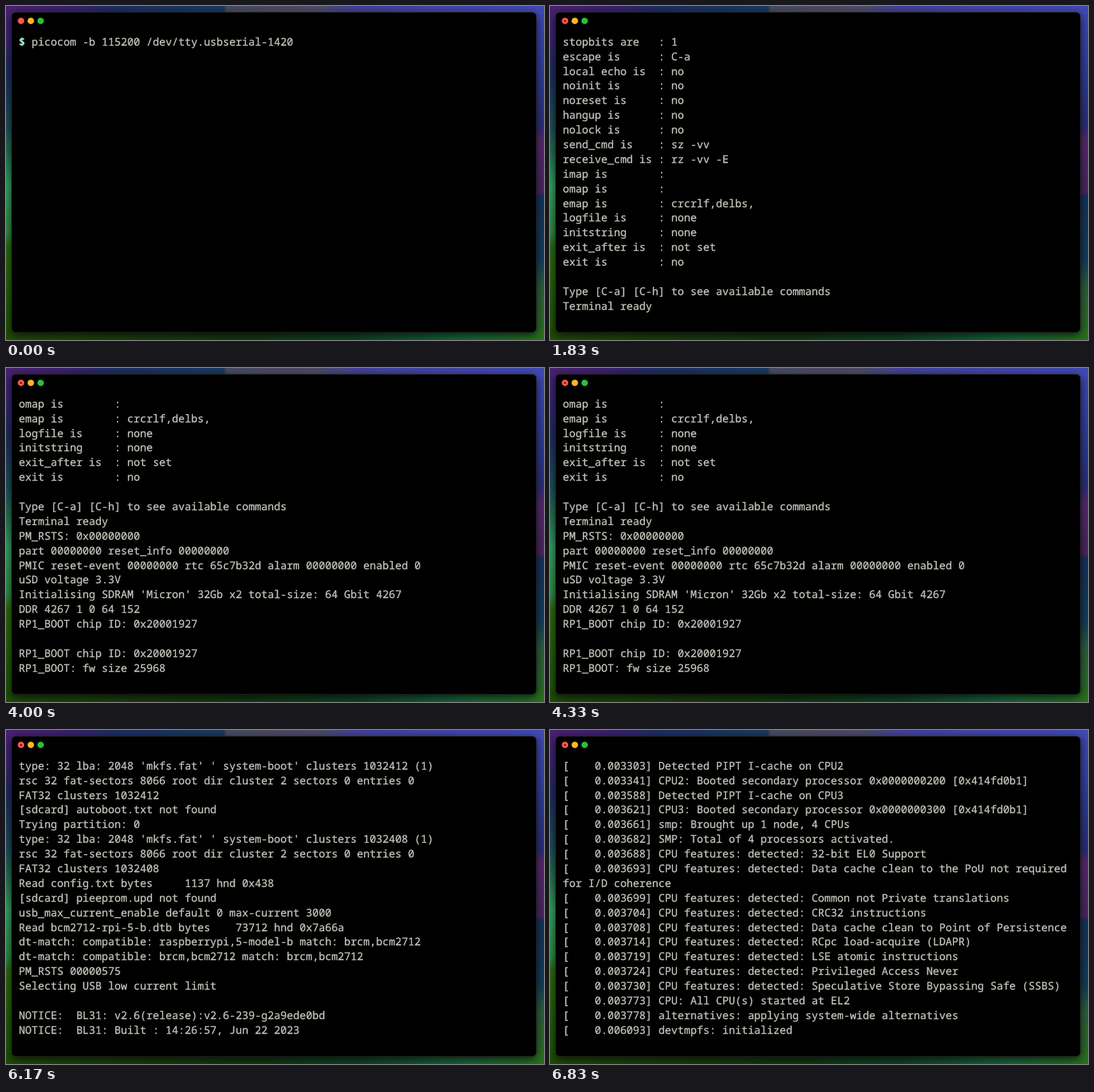
These frames come from a looping animation (800 by 498 pixels, 7000 ms). An HTML page with a canvas:

```html
<!DOCTYPE html>
<html lang="en">
<head>
<meta charset="utf-8">
<title>Serial console boot</title>
<style>
  html, body { margin: 0; width: 100%; height: 100%; overflow: hidden; background: #000; }
  canvas { display: block; }
</style>
</head>
<body>
<canvas id="stage" width="800" height="498"></canvas>
<script>
const canvas = document.getElementById('stage');
const ctx = canvas.getContext('2d');
const W = 800, H = 498, LOOP = 7000;
const ROWS = 19, ROW_HEIGHT = 21.89, LEFT = 19, BASELINE = 58.8;
const FONT = '15.82px "Noto Sans Mono", "DejaVu Sans Mono", monospace';

const COMMAND = 'picocom -b 115200 /dev/tty.usbserial-1420';

const setting = (name, value = '') => name.padEnd(15) + ': ' + value;
const kernel = (time, text) => `[    0.${time}] ${text}`;
const feature = (time, text) => kernel(time, 'CPU features: detected: ' + text);
const partition = clusters => [
  'Trying partition: 0',
  `type: 32 lba: 2048 'mkfs.fat' ' system-boot' clusters ${clusters} (1)`,
  'rsc 32 fat-sectors 8066 root dir cluster 2 sectors 0 entries 0',
  `FAT32 clusters ${clusters}`
];

const log = [
  '$ ' + COMMAND,
  setting('stopbits are', '1'),
  setting('escape is', 'C-a'),
  ...['local echo is', 'noinit is', 'noreset is', 'hangup is', 'nolock is'].map(n => setting(n, 'no')),
  setting('send_cmd is', 'sz -vv'),
  setting('receive_cmd is', 'rz -vv -E'),
  setting('imap is'),
  setting('omap is'),
  setting('emap is', 'crcrlf,delbs,'),
  setting('logfile is', 'none'),
  setting('initstring', 'none'),
  setting('exit_after is', 'not set'),
  setting('exit is', 'no'),
  '',
  'Type [C-a] [C-h] to see available commands',
  'Terminal ready',

  'PM_RSTS: 0x00000000',
  'part 00000000 reset_info 00000000',
  'PMIC reset-event 00000000 rtc 65c7b32d alarm 00000000 enabled 0',
  'uSD voltage 3.3V',
  "Initialising SDRAM 'Micron' 32Gb x2 total-size: 64 Gbit 4267",
  'DDR 4267 1 0 64 152',
  'RP1_BOOT chip ID: 0x20001927',
  '',
  'RP1_BOOT chip ID: 0x20001927',
  'RP1_BOOT: fw size 25968',

  'Voltage 12000 mV',
  ...partition(1032412),
  '[sdcard] autoboot.txt not found',
  ...partition(1032408),
  'Read config.txt bytes     1137 hnd 0x438',
  '[sdcard] pieeprom.upd not found',
  'usb_max_current_enable default 0 max-current 3000',
  'Read bcm2712-rpi-5-b.dtb bytes    73712 hnd 0x7a66a',
  'dt-match: compatible: raspberrypi,5-model-b match: brcm,bcm2712',
  'dt-match: compatible: brcm,bcm2712 match: brcm,bcm2712',
  'PM_RSTS 00000575',
  'Selecting USB low current limit',
  '',
  'NOTICE:  BL31: v2.6(release):v2.6-239-g2a9ede0bd',
  'NOTICE:  BL31: Built : 14:26:57, Jun 22 2023',

  kernel('003303', 'Detected PIPT I-cache on CPU2'),
  kernel('003341', 'CPU2: Booted secondary processor 0x0000000200 [0x414fd0b1]'),
  kernel('003588', 'Detected PIPT I-cache on CPU3'),
  kernel('003621', 'CPU3: Booted secondary processor 0x0000000300 [0x414fd0b1]'),
  kernel('003661', 'smp: Brought up 1 node, 4 CPUs'),
  kernel('003682', 'SMP: Total of 4 processors activated.'),
  feature('003688', '32-bit EL0 Support'),
  feature('003693', 'Data cache clean to the PoU not required'),
  'for I/D coherence',
  feature('003699', 'Common not Private translations'),
  feature('003704', 'CRC32 instructions'),
  feature('003708', 'Data cache clean to Point of Persistence'),
  feature('003714', 'RCpc load-acquire (LDAPR)'),
  feature('003719', 'LSE atomic instructions'),
  feature('003724', 'Privileged Access Never'),
  feature('003730', 'Speculative Store Bypassing Safe (SSBS)'),
  kernel('003773', 'CPU: All CPU(s) started at EL2'),
  kernel('003778', 'alternatives: applying system-wide alternatives'),
  kernel('006093', 'devtmpfs: initialized')
];

// [time in ms, number of log lines printed so far]
const schedule = [
  [0, 1], [670, 20], [2670, 24], [2830, 26], [3670, 27], [3830, 30],
  [4500, 35], [4670, 40], [4830, 45], [5000, 49], [6000, 51],
  [6330, 59], [6500, 65], [6670, 68], [6830, 70]
];

function gradientStrip(x, y, w, h, stops) {
  const fill = w > h ? ctx.createLinearGradient(0, 0, W, 0) : ctx.createLinearGradient(0, 0, 0, H);
  stops.forEach(([at, color]) => fill.addColorStop(at, color));
  ctx.fillStyle = fill;
  ctx.fillRect(x, y, w, h);
}

function drawWallpaper() {
  gradientStrip(0, 0, 20, H, [
    [0, '#48206f'], [0.1, '#3a2470'], [0.2, '#1d2c5c'], [0.36, '#1f4f5c'],
    [0.44, '#277052'], [0.54, '#36a060'], [0.68, '#2f8a45'], [0.72, '#2c6a14'], [1, '#1f5004']
  ]);
  gradientStrip(780, 0, 20, H, [
    [0, '#4048b4'], [0.2, '#2c3c98'], [0.36, '#2a2d78'], [0.4, '#56286c'],
    [0.56, '#4a2462'], [0.57, '#14305c'], [0.76, '#123c58'], [0.84, '#2c5c3c'], [1, '#28701c']
  ]);
  gradientStrip(0, 0, W, 12, [
    [0, '#48206f'], [0.12, '#38206c'], [0.2, '#1c2c60'], [0.405, '#173a60'],
    [0.41, '#484a60'], [0.58, '#4c4a68'], [0.66, '#41409a'], [1, '#4048b4']
  ]);
  gradientStrip(0, 482, W, 16, [
    [0, '#1f4c08'], [0.25, '#1c3c0c'], [0.45, '#123812'],
    [0.65, '#0f4424'], [0.85, '#17683c'], [1, '#28701c']
  ]);
}

function dot(x, y, radius, color) {
  ctx.fillStyle = color;
  ctx.beginPath();
  ctx.arc(x, y, radius, 0, Math.PI * 2);
  ctx.fill();
}

function drawWindow(edited) {
  ctx.save();
  ctx.shadowColor = 'rgba(0, 0, 0, 0.75)';
  ctx.shadowBlur = 14;
  ctx.shadowOffsetY = 4;
  ctx.fillStyle = '#000';
  ctx.beginPath();
  ctx.roundRect(8.5, 9.5, 780, 477, 6);
  ctx.fill();
  ctx.restore();
  ctx.strokeStyle = '#1e1e1e';
  ctx.lineWidth = 1;
  ctx.stroke();

  dot(22.3, 22.2, 4.8, '#ff564f');
  dot(36.9, 22.2, 4.8, '#ffb62b');
  dot(51.5, 22.2, 4.8, '#27c13b');
  if (edited) dot(22.3, 22.2, 1.5, '#7c0c08');
}

// A hairline outline gives the regular weight a slightly heavier stem.
function drawText(text, y, color) {
  ctx.fillStyle = ctx.strokeStyle = color;
  ctx.lineWidth = 0.3;
  ctx.fillText(text, LEFT, y);
  ctx.strokeText(text, LEFT, y);
}

function drawLog(count) {
  ctx.font = FONT;
  ctx.textRendering = 'geometricPrecision';
  ctx.textBaseline = 'alphabetic';
  const lines = log.slice(Math.max(0, count - ROWS), count);
  lines.forEach((line, row) => {
    const y = BASELINE + row * ROW_HEIGHT;
    drawText(line.replace('$', ' '), y, '#c4c5bb');
    if (line.startsWith('$')) {
      ctx.font = 'bold ' + FONT;
      drawText('$', y, '#a4f4e0');
      ctx.font = FONT;
    }
  });
}

function draw(now) {
  const time = now % LOOP;
  const [, count] = schedule.findLast(([start]) => start <= time);
  drawWallpaper();
  drawWindow(time >= 500);
  drawLog(count);
}

const start = performance.now();
function tick() {
  draw(performance.now() - start);
  requestAnimationFrame(tick);
}
tick();
</script>
</body>
</html>
```
